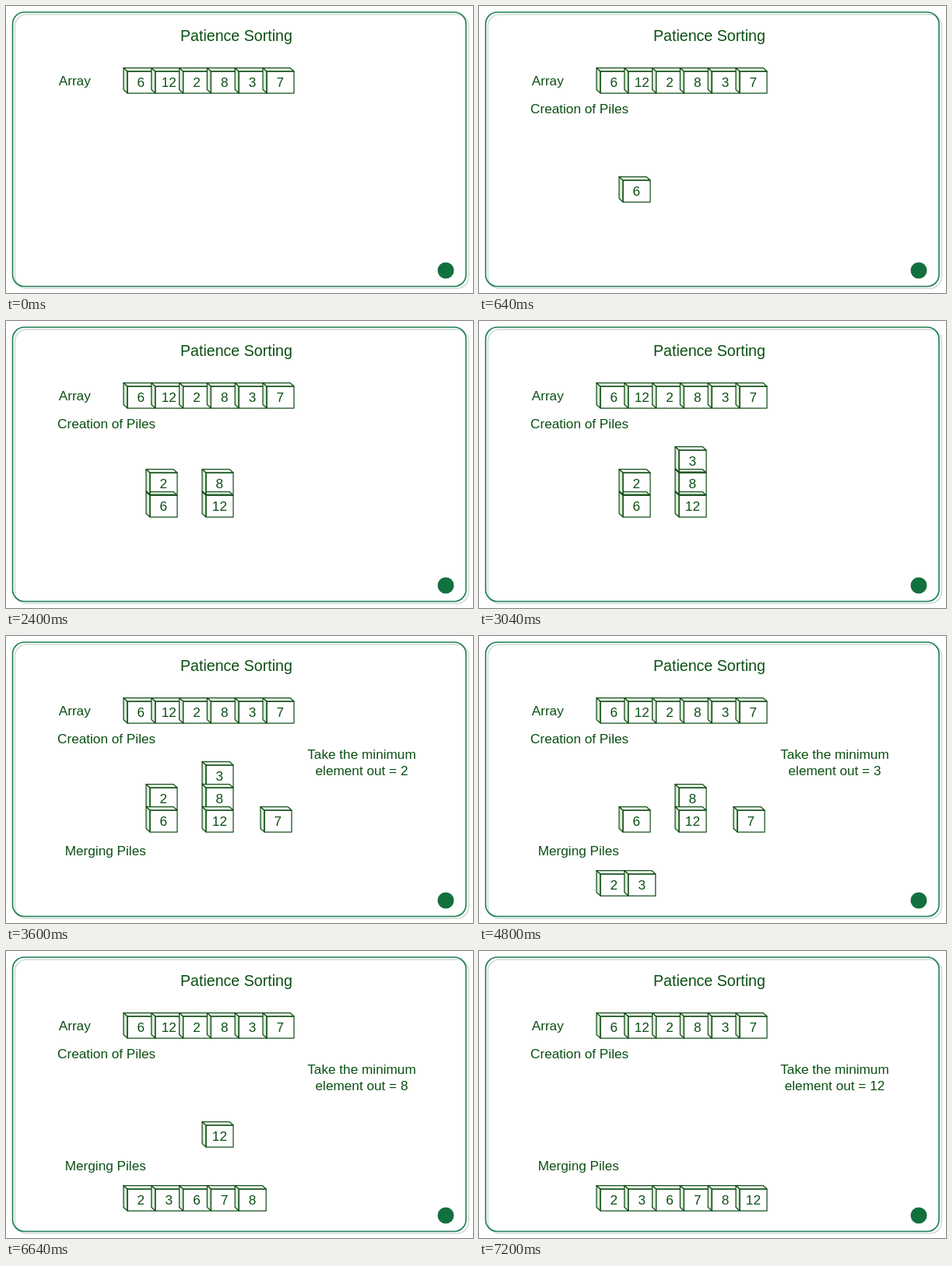
Write an HTML page that moves like this. It is 600 px wide and 369 px high and loops after 7.44 s.

```html
<!DOCTYPE html>
<html lang="en">
<head>
<meta charset="utf-8">
<title>Patience Sorting</title>
<style>
html, body { margin: 0; width: 100%; height: 100%; overflow: hidden; background: #fff; }
svg { display: block; width: 600px; height: 369px; }
text { font: 17.2px "Liberation Sans", Arial, sans-serif; fill: #0b4f12; }
.title { font-size: 19.6px; }
.mid, .box text { text-anchor: middle; }
.box path { fill: none; stroke: #15501a; stroke-width: 1.25; stroke-linejoin: round; }
.box .side { fill: #dcebd8; }
.box .top { fill: #f0f7ee; }
.frame { fill: none; stroke: #1b7d50; stroke-width: 1.6; }
.shadow { fill: none; stroke: #cfdcd5; stroke-width: 1.5; }
</style>
</head>
<body>
<svg viewBox="0 0 600 369">
  <rect class="shadow" x="11.5" y="11" width="583" height="352" rx="15"/>
  <rect class="frame" x="8.5" y="8" width="582.5" height="352.5" rx="15"/>
  <circle cx="565" cy="340" r="10.5" fill="#12703f"/>
  <text class="title" x="224" y="45">Patience Sorting</text>
  <text x="67.7" y="102">Array</text>
  <g id="array"></g>
  <g id="scene"></g>
</svg>
<script>
const values = [6, 12, 2, 8, 3, 7];
const sorted = [...values].sort((a, b) => a - b);
const pileX = [185, 257, 332];
const piles = [[6, 2], [12, 8, 3], [7]];

const slot = (i, y) => [156 + 35.8 * i, y];
const middle = (a, b) => [(a[0] + b[0]) / 2, (a[1] + b[1]) / 2];
const label = (x, y, s, cls = '') => `<text class="${cls}" x="${x}" y="${y}">${s}</text>`;

// x, y: top left corner of the front face
const box = (v, [x, y]) => `<g class="box" transform="translate(${x} ${y})">
  <path class="side" d="M0 0L-5-4.5V23.5L0 28Z"/>
  <path class="top" d="M0 0L-5-4.5H30L35 0Z"/>
  <path d="M0 0H35V28H0Z"/>
  <text x="17.4" y="20">${v}</text></g>`;

function pilePlace(v) {
  const p = piles.findIndex(pile => pile.includes(v));
  return [pileX[p], 224 - 29 * piles[p].indexOf(v)];
}

// Each value leaves the array, rests on its pile, then joins the merged row.
function place(v, step) {
  const i = values.indexOf(v), j = sorted.indexOf(v);
  const start = slot(i, 84), pile = pilePlace(v), end = slot(j, 306);
  const dealt = 2 * i + 1, taken = 2 * j + 13;
  if (step < dealt) return null;
  if (step === dealt) return middle(start, pile);
  if (step < taken) return pile;
  return step === taken ? middle(pile, end) : end;
}

function scene(step) {
  let out = '';
  if (step >= 1) out += label(66, 138, 'Creation of Piles');
  if (step >= 12) {
    const least = sorted[Math.max(0, Math.floor((step - 13) / 2))];
    out += label(75.7, 282, 'Merging Piles')
      + label(457, 158, 'Take the minimum', 'mid')
      + label(457, 179, `element out = ${least}`, 'mid');
  }
  const order = step < 12 ? values : sorted;
  for (const v of order) {
    const at = place(v, step);
    if (at) out += box(v, at);
  }
  return out;
}

const byId = id => document.getElementById(id);
byId('array').innerHTML = values.map((v, i) => box(v, slot(i, 84))).join('');

let shown = -1;
function draw() {
  const t = performance.now() % 7440;
  // Four steps every 1200 ms, the last one shorter
  const step = 4 * Math.floor(t / 1200) + Math.floor(t % 1200 / 320);
  if (step !== shown) byId('scene').innerHTML = scene(shown = step);
  requestAnimationFrame(draw);
}
draw();
</script>
</body>
</html>
```
